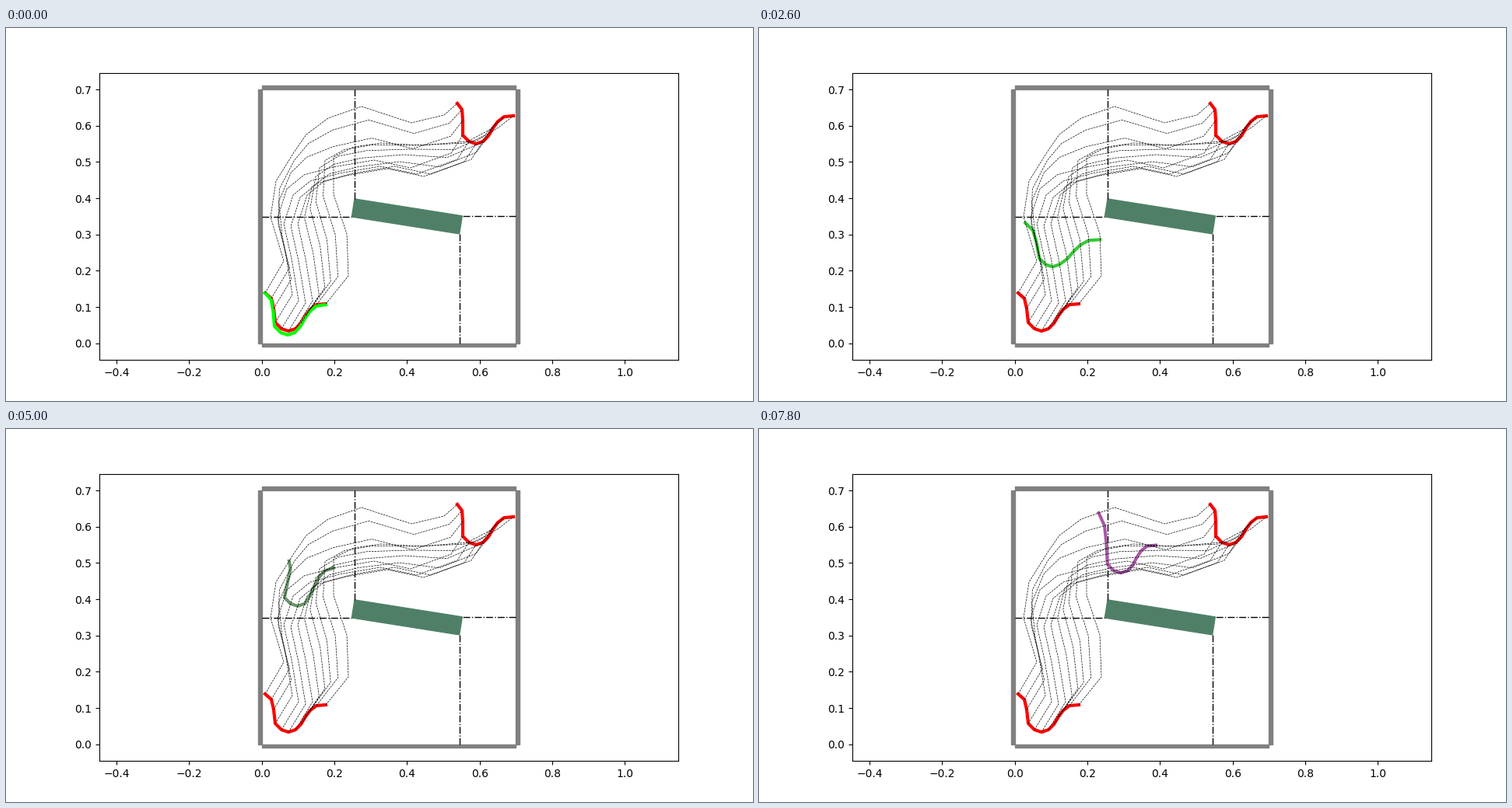
A matplotlib script for the animation above (8000 ms loop, 960 by 480 pixels).

```python
import numpy as np
import matplotlib.pyplot as plt
from matplotlib.animation import FuncAnimation
from matplotlib.patches import Polygon, Rectangle

W, H, DPI = 960, 480, 100
FRAMES, INTERVAL = 40, 200
STEPS = 60                      # steps of the whole trip from start to goal
SCALE = 369.6 / 0.792           # pixels per data unit
CENTER = 0.35

# Chain at rest, in stage pixels
HOOK = np.array([(333, 341), (341, 348), (344, 361), (346, 379), (354, 387),
                 (363, 390), (372, 387), (379, 380), (385, 370), (391, 362),
                 (399, 356), (411, 355)], float)
NODES = np.arange(len(HOOK))
TAIL, BELLY, TIP = 0, 5, 11

# Where tail, belly and tip pass on the way to the goal
STOPS = [
    [(333, 341), (362, 395), (411, 356)],
    [(357, 300), (385, 354), (440, 319)],
    [(340, 243), (376, 300), (438, 265)],
    [(347, 197), (366, 255), (421, 214)],
    [(370, 160), (378, 218), (421, 166)],
    [(386, 137), (400, 200), (447, 153)],
    [(414, 116), (437, 190), (482, 148)],
    [(457, 101), (490, 181), (535, 151)],
    [(521, 122), (537, 191), (605, 145)],
    [(563, 112), (589, 172), (633, 128)],
    [(580, 97), (604, 149), (652, 113)],
]


def to_data(px):
    """Stage pixels (y down) to data coordinates."""
    return CENTER + (px - [492, 242.4]) * [1, -1] / SCALE


def pose(stop):
    """The bend keeps its shape while both ends stretch to tail and tip."""
    tail, belly, tip = stop - HOOK[[TAIL, BELLY, TIP]]
    shift = [np.interp(NODES, [TAIL, 3, 6, TIP], values)
             for values in zip(tail, belly, belly, tip)]
    return HOOK + np.transpose(shift)


stops = np.array(STOPS, float)
poses = np.array([pose(s) for s in stops])

# Constant speed: time grows with the mean distance covered
dist = np.linalg.norm(np.diff(stops, axis=0), axis=2).mean(axis=1)
times = np.concatenate([[0], np.cumsum(dist)])
times *= STEPS / times[-1]


def chain_at(t):
    i = np.searchsorted(times, t, side="right") - 1
    u = (t - times[i]) / (times[i + 1] - times[i])
    return to_data((1 - u) * poses[i] + u * poses[i + 1])


fig, ax = plt.subplots(figsize=(W / DPI, H / DPI), dpi=DPI)
half_w, half_h = 372 / SCALE, 0.396
ax.set_xlim(CENTER - half_w, CENTER + half_w)
ax.set_ylim(CENTER - half_h, CENTER + half_h)

# Walls of the square room
SIDE, THICK = 0.7, 0.01
for x, y, w, h in [(-THICK, 0, THICK, SIDE), (SIDE, 0, THICK, SIDE),
                   (0, -THICK, SIDE, THICK), (0, SIDE, SIDE, THICK)]:
    ax.add_patch(Rectangle((x, y), w, h, color="gray"))

# Tilted obstacle and the lines between its corners and the walls
a = np.radians(-9)
u = 0.15 * np.array([np.cos(a), np.sin(a)])
v = 0.025 * np.array([-np.sin(a), np.cos(a)])
mid = np.array([0.4, 0.35])
tl, tr, br, bl = mid - u + v, mid + u + v, mid + u - v, mid - u - v
ax.add_patch(Polygon([tl, tr, br, bl], color="#4f8067"))
for p, q in [(tl, (tl[0], SIDE)), ((SIDE, tr[1]), tr),
             (br, (br[0], 0)), ((0, bl[1]), bl)]:
    ax.plot([p[0], q[0]], [p[1], q[1]], "k-.", lw=1)

# Red start and goal, with the dashed path of every node on top
for shape in (HOOK, poses[-1]):
    ax.plot(*to_data(shape).T, color="red", lw=3)
paths = to_data(np.concatenate([[HOOK], poses[1:]]))
for j in NODES:
    ax.plot(*paths[:, j].T, "k--", lw=0.5, zorder=4)

chain, = ax.plot([], [], lw=3, zorder=3)


def update(i):
    s = i / STEPS
    chain.set_data(*chain_at(i).T)
    chain.set_color((s, 1 - s, s))
    return chain,


anim = FuncAnimation(fig, update, frames=FRAMES, interval=INTERVAL,
                     repeat=True, repeat_delay=0)
plt.show()
```
